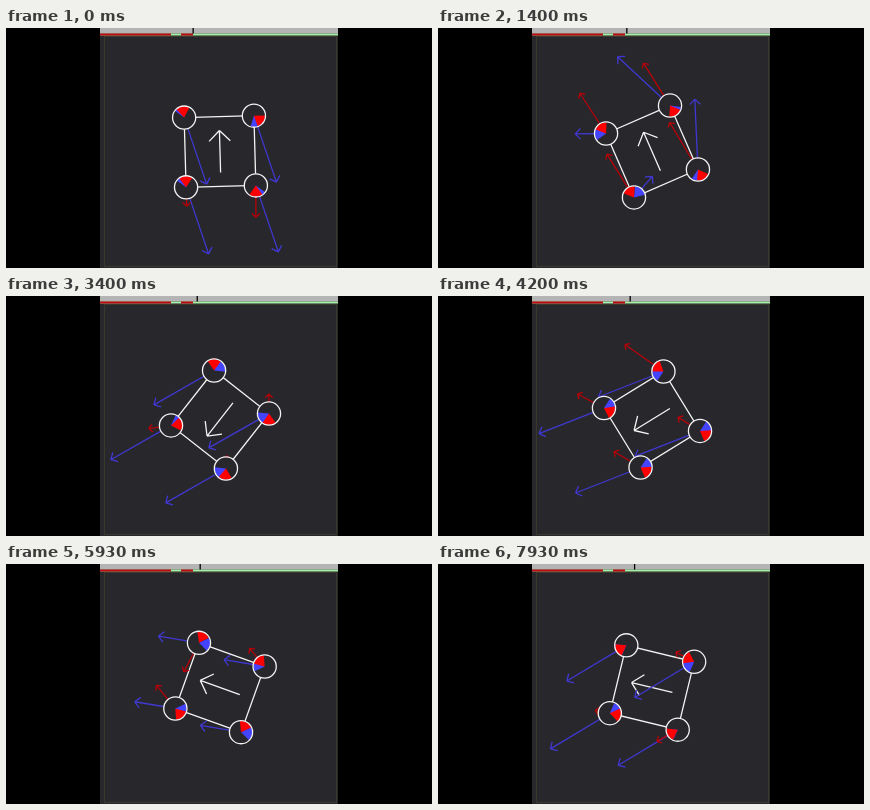
Write an HTML page with a canvas that moves like this. It is 426 px wide and 240 px high and loops after 8 s.

```html
<!DOCTYPE html>
<html>
<head>
<meta charset="utf-8">
<title>Swerve drive</title>
<style>
html, body { margin: 0; width: 100%; height: 100%; overflow: hidden; background: #000; }
canvas { display: block; width: 100%; height: 100%; }
</style>
</head>
<body>
<canvas id="stage" width="426" height="240"></canvas>
<script>
const ctx = document.getElementById('stage').getContext('2d');
const LOOP = 8000, FRAMES = 120;
const CENTER = [214, 123.5], HALF = 34.9, RADIUS = 11.6, WEDGE = 0.62;
const CORNERS = [[-HALF, -HALF], [HALF, -HALF], [HALF, HALF], [-HALF, HALF]];
const FIELD = '#27272c', WHITE = '#f4f4f4';

// Heading in degrees, commanded velocity, commanded spin, wheels as [angle, signed speed]
const POSES = [
  { t: 0, heading: -1.6, v: [22.5, 66.5], spin: 0, wheels: [[-98, -6], [35, 4], [90, 32], [-92, -19]] },
  { t: 1400, heading: -23.6, v: [-17, -35], spin: 0.77, wheels: [[-123, 48], [58, -50], [59, -55], [-122, 51]] },
  { t: 2670, heading: -159.6, v: [-56, 42], spin: 0, wheels: [[150, 3], [-40, -16], [-40, -18], [140, -14]] },
  { t: 4200, heading: -121.6, v: [-65, 25.5], spin: 0, wheels: [[31, -31], [28, -30], [215, 47], [32, -26]] },
  { t: 5130, heading: -114.5, v: [-69, -11.5], spin: 0, wheels: [[-6, -41], [-8, -45], [171, 50], [-4, -6]] },
  { t: 6800, heading: -7, v: [0, 0], spin: 0, wheels: [[132, -14], [-140, -15], [-45, -14], [-140, 14]] },
  { t: 7930, heading: -77, v: [-60, 36], spin: 0, wheels: [[10, -15], [150, 4], [207, 21], [150, 24]] }
];

const rad = degrees => degrees * Math.PI / 180;
const mix = (a, b, p) => a + (b - a) * p;
const mixAngle = (a, b, p) => a + ((((b - a) % 360) + 540) % 360 - 180) * p;
const polar = (angle, length) => [Math.cos(angle) * length, Math.sin(angle) * length];

function poseAt(time) {
  let i = 0;
  while (i < POSES.length - 2 && time >= POSES[i + 1].t) i++;
  const a = POSES[i], b = POSES[i + 1];
  const u = Math.min(1, (time - a.t) / (b.t - a.t));
  const p = u * u * (3 - 2 * u);
  return {
    heading: rad(mix(a.heading, b.heading, p)),
    v: a.v.map((value, n) => mix(value, b.v[n], p)),
    spin: mix(a.spin, b.spin, p),
    wheels: a.wheels.map(([angle, speed], n) => ({
      angle: rad(mixAngle(angle, b.wheels[n][0], p)),
      speed: mix(speed, b.wheels[n][1], p)
    }))
  };
}

function bar(color, x, y, w, h) {
  ctx.fillStyle = color;
  ctx.fillRect(x, y, w, h);
}

function arrow([x, y], [dx, dy], head, color) {
  if (Math.hypot(dx, dy) < 1) return;
  const tip = [x + dx, y + dy], back = Math.atan2(dy, dx) + Math.PI;
  ctx.strokeStyle = color;
  ctx.beginPath();
  ctx.moveTo(x, y);
  ctx.lineTo(...tip);
  for (const side of [-1, 1]) {
    const [bx, by] = polar(back + side * Math.PI / 4, head);
    ctx.moveTo(...tip);
    ctx.lineTo(tip[0] + bx, tip[1] + by);
  }
  ctx.stroke();
}

function wedge([x, y], angle, color) {
  ctx.fillStyle = color;
  ctx.beginPath();
  ctx.moveTo(x, y);
  ctx.arc(x, y, RADIUS - 0.5, angle - WEDGE, angle + WEDGE);
  ctx.fill();
}

function drawField(time) {
  bar('#000', 0, 0, 426, 240);
  bar(FIELD, 94, 0, 238, 240);
  ctx.strokeStyle = '#3a3a2c';
  ctx.lineWidth = 1;
  ctx.strokeRect(98.5, 8.5, 232, 230);
  bar('#b4b4b4', 94, 0, 238, 5.5);
  bar('#a8f0a8', 94, 5.5, 238, 2);
  bar('#c00810', 94, 5.5, 71, 2);
  bar('#c00810', 175, 5.5, 12, 2);
  bar('#000', 186.5 + time * 0.0012, 0, 1.3, 5.5);
}

function drawRobot({ heading, v, spin, wheels }) {
  const cos = Math.cos(heading), sin = Math.sin(heading);
  const rotate = ([x, y]) => [x * cos - y * sin, x * sin + y * cos];
  const place = ([x, y]) => [CENTER[0] + x, CENTER[1] + y];
  const offsets = CORNERS.map(rotate), hubs = offsets.map(place);
  const commands = offsets.map(([x, y]) => [v[0] + spin * y, v[1] - spin * x]);

  ctx.lineWidth = 1.3;
  ctx.strokeStyle = WHITE;
  ctx.beginPath();
  hubs.forEach(hub => ctx.lineTo(...hub));
  ctx.closePath();
  ctx.stroke();
  arrow(place(rotate([0, 21])), rotate([0, -42]), 15, WHITE);

  hubs.forEach((hub, i) => {
    arrow(hub, commands[i], 7.5, '#4038d0');
    arrow(hub, polar(wheels[i].angle, wheels[i].speed), 5.5, '#b80008');
  });

  hubs.forEach((hub, i) => {
    ctx.fillStyle = FIELD;
    ctx.beginPath();
    ctx.arc(...hub, RADIUS, 0, 2 * Math.PI);
    ctx.fill();
    const [cx, cy] = commands[i];
    if (Math.hypot(cx, cy) > 1) {
      // A wheel may run backwards, so its goal is the nearer end of the axis
      const goal = Math.atan2(cy, cx);
      const reversed = Math.cos(goal - wheels[i].angle) < 0;
      wedge(hub, reversed ? goal + Math.PI : goal, '#4444ff');
    }
    wedge(hub, wheels[i].angle, '#f00');
    ctx.strokeStyle = WHITE;
    ctx.beginPath();
    ctx.arc(...hub, RADIUS, 0, 2 * Math.PI);
    ctx.stroke();
  });
}

const start = performance.now();
function draw() {
  const elapsed = (performance.now() - start) % LOOP;
  const time = Math.floor(elapsed * FRAMES / LOOP + 0.02) * LOOP / FRAMES;
  drawField(time);
  drawRobot(poseAt(time));
  requestAnimationFrame(draw);
}
draw();
</script>
</body>
</html>
```
